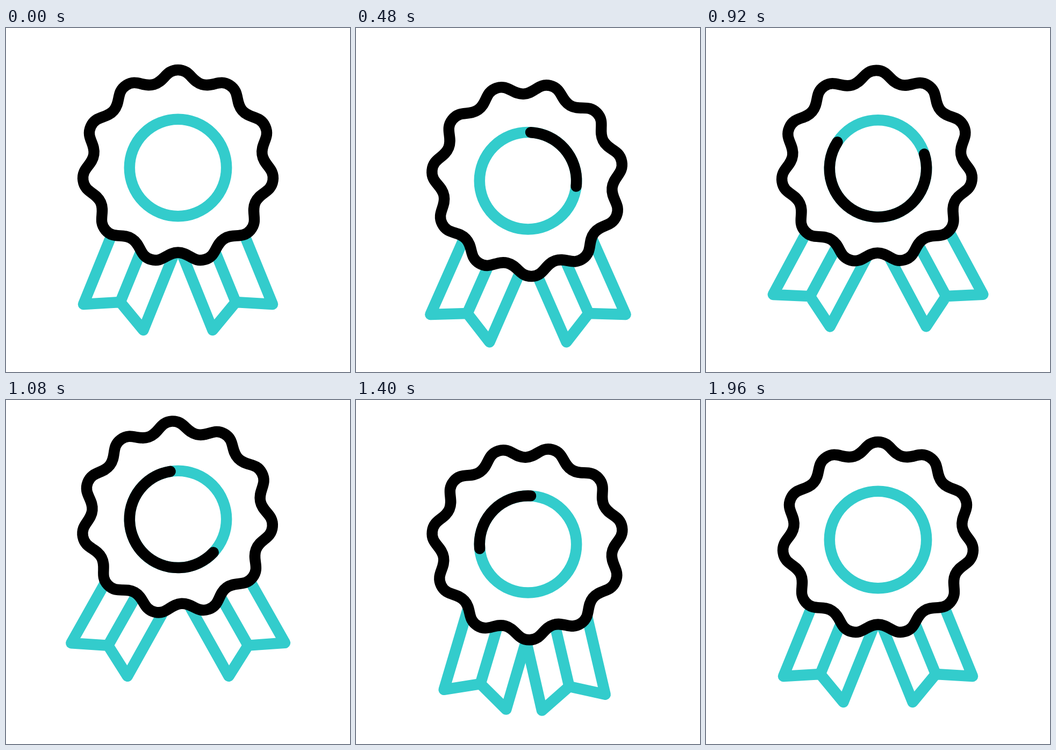
These frames come from a looping animation (640 px wide and 640 px high, 2 s). An HTML page with a canvas:

```html
<!DOCTYPE html>
<html lang="en">
<head>
<meta charset="utf-8">
<title>Award rosette</title>
<style>
  html, body { margin: 0; width: 100%; height: 100%; overflow: hidden; background: #fff; }
  canvas { display: block; width: 100vw; height: 100vh; }
</style>
</head>
<body>
<canvas id="stage" width="640" height="640"></canvas>
<script>
const ctx = document.getElementById('stage').getContext('2d');
const TEAL = '#3cc', LOOP = 2000, STEP = 40, RAD = Math.PI / 180;

// Keys are [time, value] pairs, eased in and out between neighbours.
const keys = {
  lift:  [[200, 0], [720, 43.5], [1120, -40.5], [1520, 21.9], [1840, 0]],
  spin:  [[120, 0], [920, 32.3], [1840, 0]],
  left:  [[320, 0], [720, 4.8], [1120, 7.3], [1580, -12.3], [1960, 0]],
  right: [[320, 0], [720, 4.8], [1120, 7.4], [1600, -19], [1960, 0]],
  head:  [[120, 0], [1200, 1]],
  tail:  [[560, 0], [1840, 1]]
};

function valueAt(track, t) {
  if (t <= track[0][0]) return track[0][1];
  for (let i = 1; i < track.length; i++) {
    const [t0, a] = track[i - 1], [t1, b] = track[i];
    if (t < t1) {
      const p = (t - t0) / (t1 - t0);
      return a + (b - a) * p * p * (3 - 2 * p);
    }
  }
  return track[track.length - 1][1];
}

function badgePath() {
  const count = 11, half = Math.PI / count, path = new Path2D();
  // Point at a radius and angle, moved along the circle's tangent.
  const at = (r, a, side) => [
    r * Math.sin(a) + side * Math.cos(a),
    -r * Math.cos(a) + side * Math.sin(a)
  ];
  const radius = [179.3, 159], handle = [23, 21];
  path.moveTo(...at(radius[0], 0, 0));
  for (let i = 0; i < 2 * count; i++) {
    const from = i % 2, to = 1 - from, a = i * half, b = a + half;
    path.bezierCurveTo(
      ...at(radius[from], a, handle[from]),
      ...at(radius[to], b, -handle[to]),
      ...at(radius[to], b, 0)
    );
  }
  path.closePath();
  return path;
}

const badge = badgePath();
const ribbon = new Path2D('M219 330 L144 514 L212.5 510 L255.5 562 L349 330');
const fold = new Path2D('M212.5 510 L286 330');

function drawRibbon(angle, flip) {
  ctx.save();
  ctx.translate(320, 323);
  ctx.scale(flip, 1);
  ctx.rotate(angle * RAD);
  ctx.translate(-320, -323);
  ctx.fillStyle = '#fff';
  ctx.strokeStyle = TEAL;
  ctx.fill(ribbon);
  ctx.stroke(ribbon);
  ctx.stroke(fold);
  ctx.restore();
}

function drawArc(color, from, to) {
  ctx.strokeStyle = color;
  ctx.beginPath();
  ctx.arc(320, 260, 90.2, (from - 90) * RAD, (to - 90) * RAD);
  ctx.stroke();
}

function draw(t) {
  const v = name => valueAt(keys[name], t);
  ctx.fillStyle = '#fff';
  ctx.fillRect(0, 0, 640, 640);
  ctx.lineWidth = 20.5;
  ctx.lineCap = ctx.lineJoin = 'round';
  ctx.save();
  ctx.translate(0, v('lift'));

  drawRibbon(v('left'), 1);
  drawRibbon(v('right'), -1);

  // The badge is slightly taller than wide and turns just above its centre.
  ctx.save();
  ctx.translate(320, 254);
  ctx.scale(0.995, 1.004);
  ctx.rotate(v('spin') * RAD);
  ctx.translate(0, 4);
  ctx.fillStyle = '#fff';
  ctx.strokeStyle = '#000';
  ctx.fill(badge);
  ctx.stroke(badge);
  ctx.restore();

  drawArc(TEAL, 0, 360);
  const head = v('head'), tail = v('tail');
  if (head > tail) drawArc('#000', 3.2 + 360 * tail, 3.2 + 360 * head);
  ctx.restore();
}

const start = performance.now();
function tick() {
  const t = (performance.now() - start + 1) % LOOP;
  draw(Math.floor(t / STEP) * STEP);
  requestAnimationFrame(tick);
}
tick();
</script>
</body>
</html>
```
